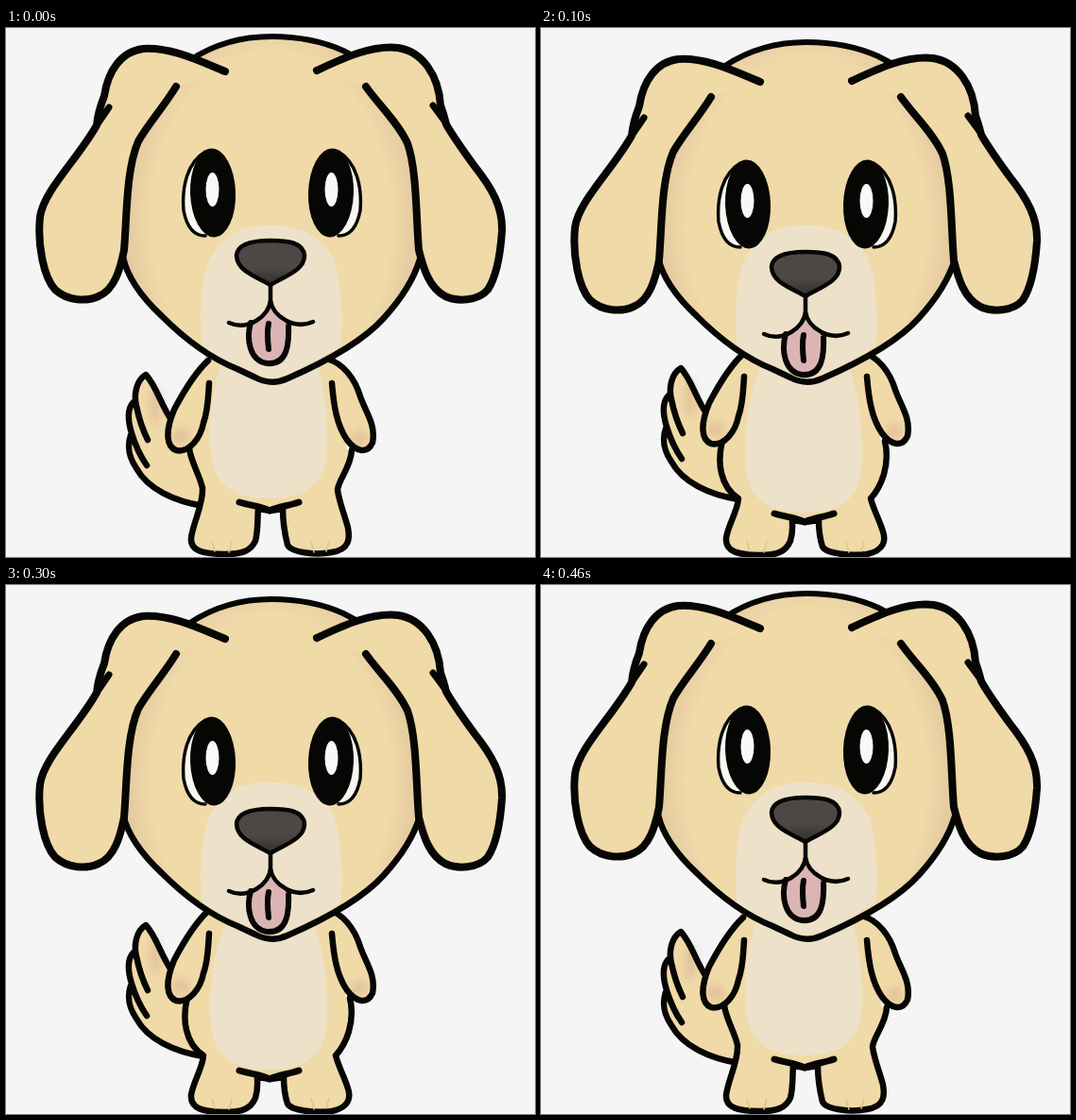
Write an HTML page that moves like this. It is 560 px wide and 560 px high and loops after 0.5 s.

```html
<!DOCTYPE html>
<html lang="en">
<head>
<meta charset="utf-8">
<title>Bouncing puppy</title>
<style>
  html, body { margin: 0; width: 100%; height: 100%; overflow: hidden; background: #f5f5f5; }
  svg { display: block; width: 100vw; height: 100vh; }
  path { stroke-linecap: round; stroke-linejoin: round; }

  .line { fill: none; stroke: #060604; }
  .fur { fill: #f0daa8; stroke: #060604; }
  .plain { fill: #f0daa8; }
  .cream { fill: #ede1c9; }
  .shade { fill: #d3ab8b; opacity: .5; filter: url(#soft); }

  /* Each part holds at rest, --mid and --far, then returns. */
  .bob { animation: bob 500ms step-end infinite; }
  @keyframes bob {
    0%, 80%, 100% { transform: translateY(0); }
    20%, 60% { transform: translateY(var(--mid)); }
    40% { transform: translateY(var(--far)); }
  }
  .tail  { --mid: -7px;  --far: -20px; }
  .arms  { --mid: -7px;  --far: -17px; }
  .belly { --mid: 15px;  --far: 8px; }
  .hem   { --mid: 12px;  --far: 8px; }
  .crown { --mid: 6px;   --far: 12px; }
  .jaw   { --mid: 0px;   --far: 12px; }
  .ears  { --mid: 11px;  --far: 16px; }
  .face  { --mid: 12px;  --far: 21px; }

  .body { animation: squash 500ms step-end infinite; }
  @keyframes squash {
    0%, 80%, 100% { d: path("M194 445C196 460 205 473 208 487C209 505 198 523 196 540C195 554 210 557 232 557C249 557 259 554 264 543C267 532 266 520 267 509L280 511L293 509C293 525 295 535 298 547C302 556 330 558 345 555C364 552 364 540 362 529C358 514 353 503 351 489C352 478 365 465 366 447"); }
    20%, 60% { d: path("M192 437C186 460 190 486 209 498C208 512 198 526 196 540C195 555 210 558 232 558C249 558 259 555 264 543C267 533 266 530 266 521L280 523L294 521C294 530 295 540 298 549C302 557 330 559 345 557C364 553 365 542 362 533C358 520 352 510 349 498C360 486 370 463 364 437"); }
    40% { d: path("M193 430C190 452 195 478 209 493C209 508 198 524 196 540C195 555 210 558 232 558C249 558 259 555 264 543C267 533 266 525 266 516L280 518L294 516C294 527 295 538 298 549C302 557 330 559 345 557C364 553 365 542 362 532C358 517 352 506 350 493C361 480 370 455 366 430"); }
  }
</style>
</head>
<body>
<svg viewBox="0 0 560 560">
  <defs>
    <filter id="soft" x="-100%" y="-100%" width="300%" height="300%"><feGaussianBlur stdDeviation="5"/></filter>
    <radialGradient id="skull" gradientUnits="userSpaceOnUse" cx="0" cy="0" r="1"
      gradientTransform="translate(281 205) scale(166 235)">
      <stop offset=".76" stop-color="#f0daa8"/>
      <stop offset="1" stop-color="#dfc39c"/>
    </radialGradient>
    <linearGradient id="snout" x2="0" y2="1">
      <stop offset=".6" stop-color="#4d4846"/>
      <stop offset=".9" stop-color="#383433"/>
    </linearGradient>
    <g id="eye">
      <path d="M211 131C192 142 186 168 188 193C191 209 198 220 211 220" fill="#f8f7f1" stroke="#060604" stroke-width="3.500"/>
      <ellipse cx="219" cy="174.500" rx="24" ry="47" fill="#060604" transform="rotate(-2 219 174)"/>
      <ellipse cx="218.500" cy="171" rx="7" ry="18" fill="#f8f8f7"/>
    </g>
  </defs>
  <rect width="560" height="560" fill="#f5f5f5"/>

  <g class="bob tail" stroke-width="6.500">
    <path class="plain" d="M148 367C160 380 164 400 176 416L220 450L210 507C180 502 150 489 137 467C127 447 134 440 131 428C127 410 130 400 136 394C137 384 140 373 148 367"/>
    <ellipse class="shade" cx="158" cy="400" rx="6" ry="20"/>
    <path class="line" d="M176 416C164 400 160 380 148 367C138 373 135 388 138 400C141 415 145 426 150 436M135 396C127 404 130 419 133 429C137 442 142 453 149 463M132 431C127 446 132 457 138 466C150 488 178 501 209 506"/>
  </g>

  <path class="fur body" stroke-width="6.500" d="M194 445"/>
  <path class="plain" d="M212 340H348L361 450H198Z"/>
  <g class="bob belly">
    <path class="cream" d="M240 330C222 360 215 400 216 440C217 480 235 498 278 498C322 498 340 480 340 440C340 400 336 365 320 330Z"/>
  </g>
  <path class="bob hem line" stroke-width="7" d="M247 502C260 506 269 506 279 511C290 506 299 506 310 502"/>
  <path d="M218 544L221 554M239 544L236 555M323 544L326 555M342 544L339 554" fill="none" stroke="#dfc391" stroke-width="1.500"/>

  <g class="bob arms" stroke-width="6.500">
    <path class="plain" d="M214 352C201 364 188 385 178 404C168 428 170 443 180 447C194 450 206 434 209 418C214 405 214 390 215 376Z"/>
    <path class="plain" d="M342 351C356 355 369 370 375 390C380 405 392 420 388 439C382 452 370 448 361 436C350 420 347 400 345 376Z"/>
    <ellipse class="shade" cx="185" cy="432" rx="10" ry="9"/>
    <ellipse class="shade" cx="374" cy="434" rx="9" ry="8"/>
    <path class="line" d="M214 352C201 364 188 385 178 404C168 428 170 443 180 447C194 450 206 434 209 418C214 405 214 390 215 376M342 351C356 355 369 370 375 390C380 405 392 420 388 439C382 452 370 448 361 436C350 420 347 400 345 376"/>
  </g>

  <g class="bob jaw">
    <path fill="url(#skull)" d="M124 243C130 270 150 291 165 305C190 330 215 349 245 361L264 371Q281 378 298 372C330 357 375 335 400 307C420 285 432 265 438 245L425 110H140Z"/>
  </g>
  <g class="bob crown">
    <path fill="url(#skull)" d="M124 243C130 150 150 50 195 34C225 14 255 9 281 9C310 9 337 15 357 24L374 33C415 60 435 150 438 243Z"/>
    <path class="line" stroke-width="6" d="M195 34C225 14 255 9 281 9C310 9 337 15 357 24L374 33"/>
  </g>
  <path class="cream" d="M281 209C243 207 219 228 211 258C205 285 205 320 208 341L250 361L281 372L310 363L354 337C358 310 355 272 348 248C338 222 312 208 281 209"/>
  <path class="bob jaw line" stroke-width="6.500" d="M124 243C130 270 150 291 165 305C190 330 215 349 245 361L264 370Q281 379 298 371C330 357 375 335 400 307C420 285 432 265 438 245"/>

  <g class="bob ears" stroke-width="8">
    <path class="fur" d="M232 46C205 35 175 20 145 22C122 25 108 45 104 72C100 82 97 92 96 103C75 140 40 172 36 200C33 230 40 264 52 277C65 289 85 290 98 284C115 277 121 255 125 235C128 200 127 150 140 120C150 102 168 82 180 62"/>
    <path class="fur" d="M329 45C355 33 385 18 415 21C441 25 458 50 460 82C463 90 465 98 466 102C474 116 482 127 495 145C515 170 526 190 525 215C523 245 518 265 510 277C500 289 478 290 465 284C448 275 442 255 437 235C434 200 435 150 425 122C415 100 395 82 381 62"/>
    <path class="line" stroke-width="7" d="M109 84L96 103M452 82L466 101"/>
  </g>

  <g class="bob face">
    <use href="#eye"/>
    <use href="#eye" transform="matrix(-1 0 0 1 563 0)"/>
    <path fill="#dbb4b4" stroke="#060604" stroke-width="6" d="M259 312C254 330 258 352 276 355C298 357 300 335 299 312"/>
    <path fill="#dbb4b4" d="M260 314Q276 306 280 292Q286 308 298 314Z"/>
    <path class="line" stroke-width="6" d="M278 313C276 322 277 331 278 340"/>
    <path class="line" stroke-width="4.500" d="M280 271V288C279 305 256 321 236 312M280 288C282 305 305 320 325 311"/>
    <path fill="url(#snout)" stroke="#060604" stroke-width="4.500" d="M244 241C245 227 265 225 280 225C298 225 315 227 316 241C316 256 297 262 280 272C262 262 245 257 244 241Z"/>
  </g>
</svg>
</body>
</html>
```
